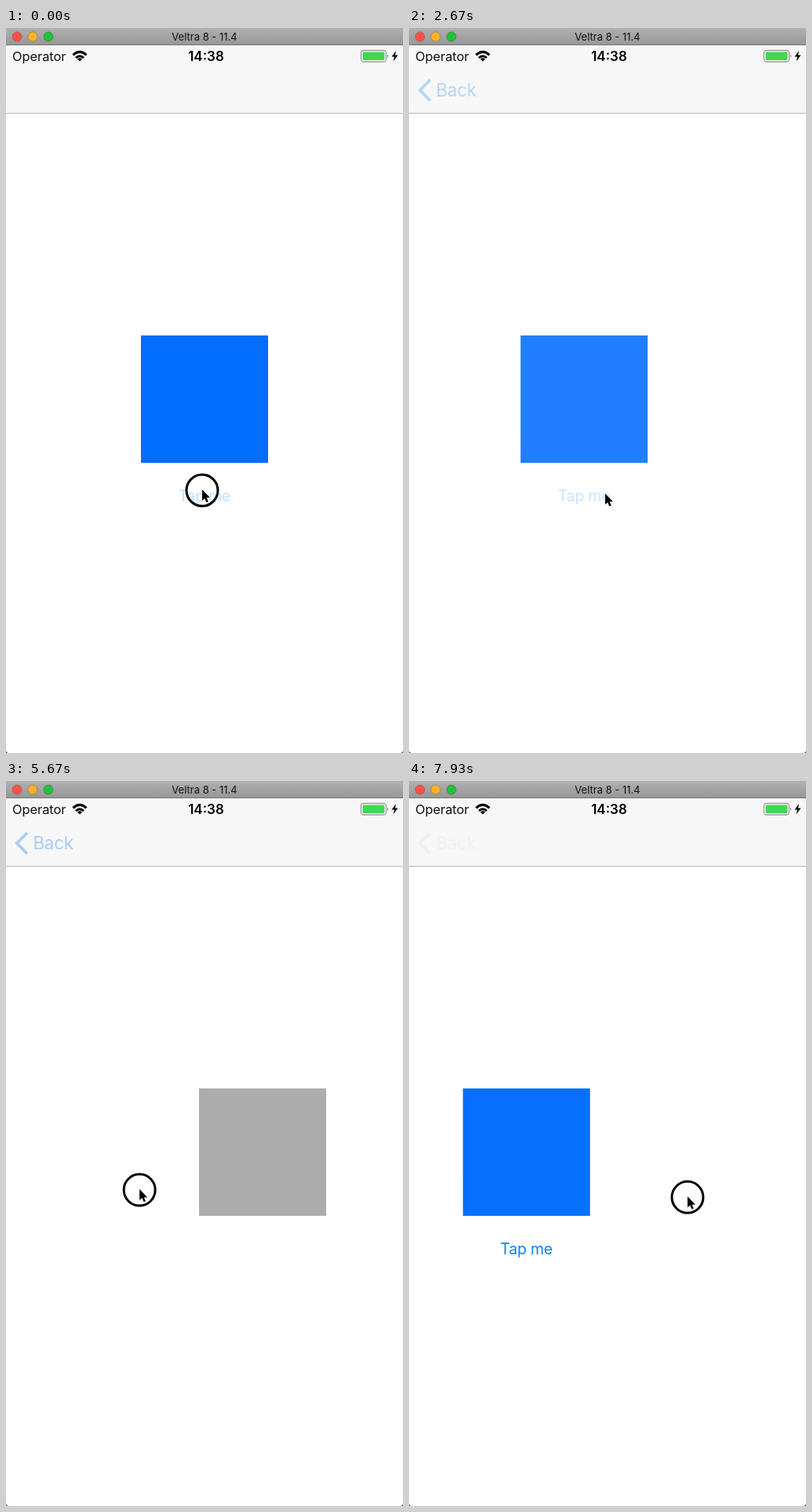
These frames come from a looping animation (506x922 px, 8 s). An HTML page:

```html
<!DOCTYPE html>
<html lang="en">
<head>
<meta charset="utf-8">
<title>Navigation transition</title>
<style>
  html, body { margin: 0; width: 100%; height: 100%; overflow: hidden; background: #fff; }
  svg { display: block; width: 100vw; height: 100vh; }
  text { font-family: Inter, "Liberation Sans", sans-serif; }
</style>
</head>
<body>
<svg viewBox="0 0 506 922">
  <defs>
    <linearGradient id="chrome" x2="0" y2="1">
      <stop stop-color="#b0b0b0"/>
      <stop offset="1" stop-color="#969696"/>
    </linearGradient>
  </defs>
  <rect width="506" height="922" fill="#fff"/>

  <g id="home">
    <rect x="172" y="391" width="162" height="162" fill="#036dff"/>
    <text id="tap" x="219.5" y="602" font-size="19.5" letter-spacing="-.2" fill="#0a7cf5">Tap me</text>
  </g>
  <g id="detail">
    <rect y="109" width="506" height="813" fill="#fff"/>
    <rect x="172" y="391" width="162" height="162" fill="#9f9f9f"/>
  </g>

  <rect y="22" width="506" height="86" fill="#f7f7f7"/>
  <rect y="108" width="506" height="1" fill="#b9b9b9"/>
  <g id="back" fill="#0a7cf5">
    <path d="M27 66 14 79 27 92.5" fill="none" stroke="#0a7cf5" stroke-width="3.8"/>
    <text x="34.5" y="87" font-size="22.5" letter-spacing="-.35">Back</text>
  </g>

  <text x="8" y="42" font-size="16.5" letter-spacing="-.1" fill="#111">Operator</text>
  <g fill="none" stroke="#000" stroke-width="3">
    <path d="M85.5 34.3Q94 26.5 102.5 34.3"/>
    <path d="M89 38Q94 33.4 99 38"/>
  </g>
  <path d="M91 39.5Q94 37 97 39.5L94 42.5Z"/>
  <text x="255" y="42" font-size="17" font-weight="600" text-anchor="middle">14:38</text>
  <rect x="452.5" y="28.5" width="32" height="14.5" rx="3.5" fill="#fff" stroke="#999" stroke-width="1.3"/>
  <rect x="454.5" y="30.5" width="28" height="10.5" rx="1.5" fill="#41d653"/>
  <path d="M486 33.5Q488.5 35.7 486 38Z" fill="#888"/>
  <path d="M497 29 491.5 36.5H495L493.5 42.5 499.5 34.5H496Z"/>

  <rect width="506" height="22" fill="url(#chrome)"/>
  <rect y="21" width="506" height="1" fill="#777"/>
  <g stroke-opacity=".25" stroke="#000" stroke-width=".8">
    <circle cx="14" cy="11" r="6" fill="#ff5249"/>
    <circle cx="34" cy="11" r="6" fill="#fdb226"/>
    <circle cx="54" cy="11" r="6" fill="#22c13b"/>
  </g>
  <text x="253" y="16" font-size="13" text-anchor="middle" fill="#111">Veltra 8 - 11.4</text>
  <path d="M0 918Q0 922 4 922H0ZM506 918Q506 922 502 922H506Z" fill="#666"/>

  <g id="pointer">
    <circle id="ring" cy="1" r="20" fill="none" stroke="#000" stroke-width="3"/>
    <path d="M0 0V14L3.2 11.2 5.4 16.2 7.8 15.2 5.7 10.3H10Z" stroke="#fff" stroke-width="1.4" paint-order="stroke"/>
  </g>
</svg>
<script>
const LOOP = 8000, FPS = 15, WIDTH = 506, PARALLAX = 152;
const REST = 150; // pause before each press and after each release

// Where the pointer presses, and when.
const firstTap = { x: 250, y: 587, press: 0, release: 200 };
const goBack = { x: 62, y: 82, press: 1480, release: 1640 };
const secondTap = { x: 250, y: 592, press: 2460, release: 2615 };
const edge = { x: 8, y: 511, press: 3470, release: LOOP };
const stops = [firstTap, goBack, secondTap, edge];

const $ = id => document.getElementById(id);
const phase = (t, start, end) => Math.max(0, Math.min(1, (t - start) / (end - start)));
const smooth = u => u * u * (3 - 2 * u);
const easeOut = u => 1 - (1 - u) ** 2;

function place(id, x, opacity) {
  $(id).setAttribute("transform", `translate(${x} 0)`);
  $(id).setAttribute("opacity", opacity);
}

function show(homeX, homeOpacity, detailX, detailOpacity, backOpacity) {
  place("home", homeX, homeOpacity);
  place("detail", detailX, detailOpacity);
  $("back").setAttribute("opacity", backOpacity);
}

function push(t, start) {
  const p = easeOut(phase(t, start, start + 500));
  show(-PARALLAX * p, 1 - .6 * p, WIDTH * (1 - p), 1, p ** .8);
}

function dissolve(t, start) {
  const u = phase(t, start, start + 450);
  show(0, 1, 0, 1 - smooth(u), .28 * (1 - u));
}

// Steady pull to the right, a pause, then a short tug back and forth.
function dragged(t) {
  const u = phase(t, 7270, 7900);
  return 316 * phase(t, 4187, 7070) + 31 * u - 40 * Math.sin(Math.PI * u);
}

function swipe(d) {
  const x = d / WIDTH, a = x ** 2.04, b = 1.26 * (1 - x) ** 2.04;
  const p = a / (a + b);
  show(WIDTH * (p - 1), Math.min(1, .78 + .25 * p), WIDTH * p, 1 - p, (1 - x) ** 2.8);
}

function pointerAt(t) {
  let { x, y } = firstTap;
  stops.slice(1).forEach((stop, i) => {
    const u = smooth(phase(t, stops[i].release + REST, stop.press - REST));
    x += (stop.x - x) * u;
    y += (stop.y - y) * u;
  });
  const d = dragged(t);
  return [x + d, y + d / 20];
}

function draw(t) {
  if (t < goBack.press) push(t, firstTap.release);
  else if (t < secondTap.press) dissolve(t, goBack.release);
  else if (t < edge.press) push(t, secondTap.release);
  else swipe(dragged(t));

  const lit = t < goBack.press || (t >= secondTap.press && t < edge.press);
  $("tap").setAttribute("opacity", lit ? .24 : 1);

  const down = stops.some(s => t >= s.press && t < s.release);
  $("ring").setAttribute("visibility", down ? "visible" : "hidden");
  $("pointer").setAttribute("transform", `translate(${pointerAt(t)})`);
}

const began = performance.now();
function tick() {
  const t = (performance.now() - began) % LOOP;
  draw(Math.floor(t * FPS / 1000 + .1) * 1000 / FPS);
  requestAnimationFrame(tick);
}
tick();
</script>
</body>
</html>
```
